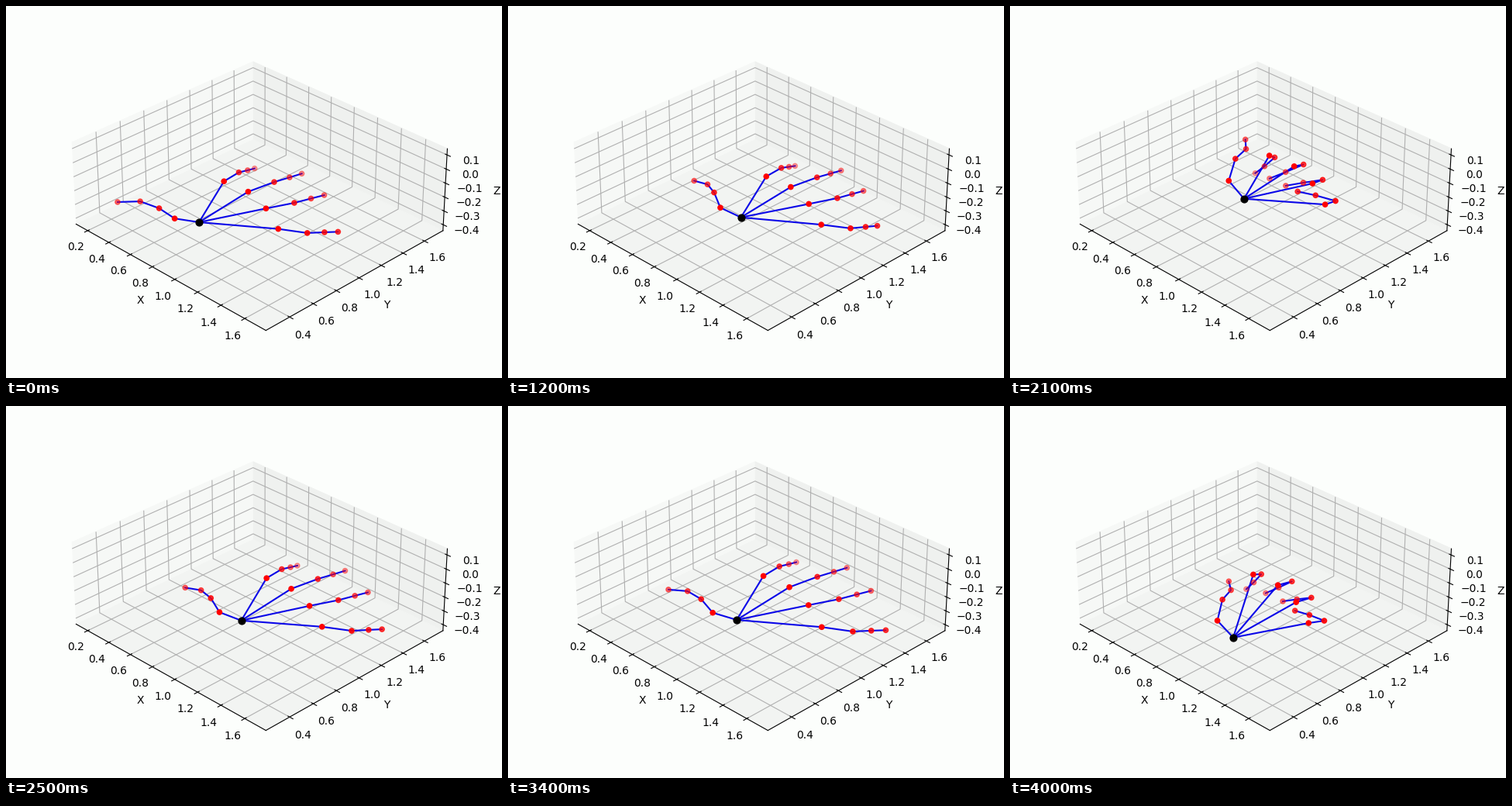
Write a matplotlib script that moves like this. It is 640 px wide and 480 px high and loops after 4.1 s.

```python
import numpy as np
import matplotlib.pyplot as plt
from matplotlib.animation import FuncAnimation

W, H, FRAMES = 640, 480, 41
PAPER = "#fcfefc"

fig = plt.figure(figsize=(W / 100, H / 100), dpi=100, facecolor=PAPER)

# Room: equally scaled 3D axes filling the figure height.
room = fig.add_axes([0, 0, 1, 1], projection="3d", facecolor=PAPER)
room.view_init(elev=30, azim=-45)
center = np.array([0.931, 0.990, -0.150])
half = np.array([0.843, 0.787, 0.293])
low, high = center - half, center + half
room.set_xlim(low[0], high[0])
room.set_ylim(low[1], high[1])
room.set_zlim(low[2], high[2])
room.set_box_aspect(2 * half)
room.set_xticks(np.arange(1, 9) / 5)
room.set_yticks(np.arange(2, 9) / 5)
room.set_zticks(np.arange(-4, 2) / 10)
room.set_xlabel("X")
room.set_ylabel("Y")
room.set_zlabel("Z")
for axis, shade in ((room.xaxis, "#f6f8f6"), (room.yaxis, "#eff1ef"),
                    (room.zaxis, "#f2f4f2")):
    axis.set_pane_color(shade)

# Layer in stage pixels for the hand.
stage = fig.add_axes([0, 0, 1, 1])
stage.set_xlim(0, W)
stage.set_ylim(H, 0)
stage.axis("off")

# Index to pinky: knuckle seen from the wrist, pointing direction, dip.
KNUCKLES = np.array([(106.5, 9), (90, -18.5), (66, -41), (33.5, -55)])
POINTING = np.array([(39, 5.5), (38, -7.5), (35, -13), (20, -12)])
DIPS = np.linspace(-7, 7, 4)

# The three finger bones: length, angle at rest, extra angle in a fist.
LENGTH = np.array([1, 0.85, 0.65])
REST = np.array([0, 0.8, 0.77])
BEND = np.array([1.47, 2.03, 2.4])

THUMB_OPEN = np.array([(-30, -9), (-14.5, -17), (-17, -10), (-24, -2)])
THUMB_SHUT = np.array([(-19, -25), (11, -30), (17, -13), (1.5, -13.5)])

PERIOD, FIRST_FIST = 8, 6.4
TIP_ALPHA = np.array([0.55, 0.75, 0.5, 0.42, 0.35])
ALPHA = 1 - np.outer(1 - TIP_ALPHA, [0, 0.4, 0.75, 1]).ravel()


def pose(step):
    """Wrist position and the joints of thumb, index ... pinky."""
    entry = max(0, 1 - step / 6) ** 2
    d = step - FIRST_FIST
    d -= PERIOD * max(0, round(d / PERIOD))  # steps from the nearest fist
    curl = np.exp(-abs(d / 1.95) ** 5)

    sway = 4.5 * np.cos(2 * np.pi * (step - 25) / 17)
    wrist = np.array([299.5 + sway - curl * (8.7 + 8 * d) - 46 * entry,
                      276 + curl * (22 * d - 2.2) + 3 * entry])
    lift = curl * (20 + 13 * d) * np.array([-0.25, -1])
    reach = 1 + 0.05 * (min(abs(d), 4) - 3) * (1 - curl) - 0.09 * entry

    grip = np.sqrt(curl) - 0.25 * entry
    chains = [THUMB_OPEN + grip * (THUMB_SHUT - THUMB_OPEN)]
    angle = REST + curl * BEND
    for knuckle, pointing, dip in zip(KNUCKLES, POINTING, DIPS):
        bones = (np.outer(LENGTH * np.cos(angle), pointing)
                 + np.outer(LENGTH * np.sin(angle), (0, dip)))
        chains.append(np.vstack([knuckle + lift, bones]))
    return wrist, wrist + reach * np.cumsum(chains, axis=1)


lines = [stage.plot([], [], color="#0a06e8", lw=1.5)[0] for _ in range(5)]
dots = stage.scatter(np.zeros(20), np.zeros(20), s=20, zorder=3,
                     c=[(1, 0, 0, a) for a in ALPHA])
palm = stage.scatter([0], [0], s=40, c="black", zorder=4)


def draw(step):
    wrist, joints = pose(step)
    for line, finger in zip(lines, joints):
        line.set_data(*np.vstack([wrist, finger]).T)
    dots.set_offsets(joints.reshape(-1, 2))
    palm.set_offsets([wrist])
    return [*lines, dots, palm]


anim = FuncAnimation(fig, draw, frames=FRAMES, interval=100,
                     init_func=lambda: draw(0), repeat=True, blit=False)
plt.show()
```
